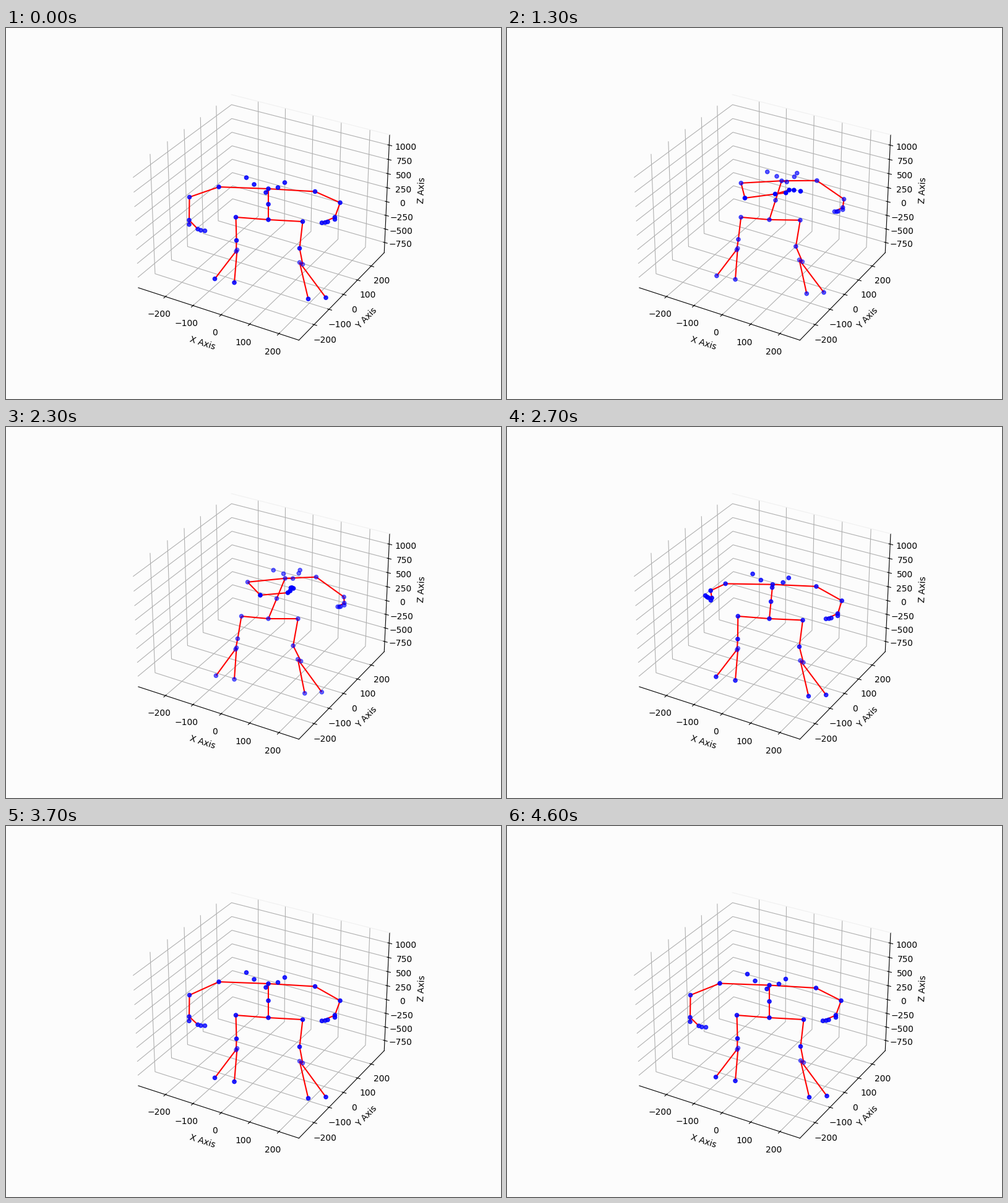
A matplotlib script for the animation above (4.7 s loop, 800 by 600 pixels).

```python
import numpy as np
import matplotlib.pyplot as plt
from matplotlib.animation import FuncAnimation
from matplotlib.collections import LineCollection

W, H, DPI = 800, 600, 100
FRAMES, STEP = 47, 100
LOOP = FRAMES * STEP
BG = "#fcfcfc"
PELVIS = np.array([423.5, 309.5])

# Ready stance (x, y) and how far a full body turn moves each joint (dx, dy)
UPPER = dict(
    neck=(423.5, 257, 28.5, -15.5), nose=(419.5, 263, 46, -21.5),
    eye_r=(400.5, 250, 50, -16), eye_l=(439, 255, 35.5, -22),
    ear_r=(388, 239, 46, -10.5), ear_l=(450, 247, 26, -19),
    shoulder_r=(343.5, 254, 49, -6), shoulder_l=(499, 261.5, 2, -22.5))
LOWER = dict(
    elbow_l=(539.5, 282, 6.5, -8), wrist_l=(531, 305.5, 16, -22.5), tip_l=(510, 314.5, 27, -25.5),
    hip_r=(371, 305.5, 9.5, 0), knee_r=(372, 342.5, 2, 0), ankle_r=(373, 357.5, -1, 0),
    toe_r=(337, 403.5, 2, 0), ball_r=(368.5, 409.5, 0, 0),
    hip_l=(479, 312.5, -8, -3), knee_l=(474, 355, -11, -1), ankle_l=(474, 377.5, -3, -1),
    toe_l=(488, 435.5, -6, -3), ball_l=(516.5, 433.5, -7, -3))

CHAINS = """pelvis spine neck nose
shoulder_r neck shoulder_l elbow_l wrist_l tip_l
wrist_l thumb_l
shoulder_r elbow_r wrist_r index_r
wrist_r thumb_r
pelvis hip_r knee_r heel_r ankle_r toe_r
ankle_r ball_r
pelvis hip_l knee_l heel_l ankle_l toe_l
ankle_l ball_l"""
BONES = [pair for chain in map(str.split, CHAINS.splitlines())
         for pair in zip(chain, chain[1:])]


# Keys: time, then body turn, torso drop, right elbow, wrist and fingertip
def swing(t, turn, drop, elbow, wrist, tip):
    return t, np.array([turn, drop, *elbow, *wrist, *tip], float)


def ready(t, drop):
    return swing(t, 0, drop, (296, 273), (295.5, 309 + drop / 2), (321, 325 + drop))


def back(t, x):
    return swing(t, -.12, 0, (x + 38, 270), (x + 22, 298), (x, 306))


def follow(t, turn, y):
    return swing(t, turn, 0, (405, 258), (452, y + 26), (476, y))


KEYS = [
    ready(0, 2.5), back(300, 235),
    swing(600, 1, -1.5, (395, 273.5), (463.5, 280), (497.5, 282)),
    follow(700, 1, 203), back(1100, 269),
    swing(1300, .7, .5, (384, 274.5), (433, 268), (474, 263.5)),
    follow(1480, .8, 229), back(1850, 250),
    swing(2300, .95, 2, (410.5, 271.5), (455, 267.5), (464, 260.5)),
    follow(2450, .95, 209), back(2850, 262),
    swing(3100, .55, -2, (377.5, 280), (404, 280), (439, 276.5)),
    follow(3250, .8, 219), back(3580, 268), ready(3700, -2.5),
    swing(3980, .75, 0, (394, 275), (430, 273), (452, 268)),
    back(4250, 265), ready(4600, 0),
]


def key(i):
    turn, k = divmod(i, len(KEYS))
    t, v = KEYS[k]
    return t + turn * LOOP, v


def slope(i):
    (t0, v0), (t1, v1) = key(i - 1), key(i + 1)
    return (v1 - v0) / (t1 - t0)


def control(t):
    """Cyclic Hermite curve through the keys."""
    i = sum(k[0] <= t for k in KEYS) - 1
    (t0, v0), (t1, v1) = key(i), key(i + 1)
    d = t1 - t0
    s = (t - t0) / d
    return (v0 + (v1 - v0) * s * s * (3 - 2 * s)
            + d * s * (1 - s) ** 2 * slope(i)
            - d * s * s * (1 - s) * slope(i + 1))


def hand(side, wrist, tip, flat, size):
    """Fingers bow between wrist and tip; the thumb hangs until the hand is flat."""
    reach = tip - wrist
    sag = size * (5 - 9 * flat)
    pts = {"thumb": wrist + .42 * flat * reach + (0, 7 * size * (1 - flat))}
    for name, f in (("index", .55), ("middle", .74)):
        pts[name] = wrist + f * reach + (0, sag * np.sin(np.pi * f))
    return {f"{name}_{side}": p for name, p in pts.items()}


def joints(t):
    """Joint positions and marker opacities by name."""
    turn, drop, *arm = control(t)
    flat = np.clip(2 * turn, 0, 1)
    sway = 4.5 * np.cos(2 * np.pi * (t - 3900) / LOOP)
    p = {"pelvis": PELVIS}
    for name, (x, y, dx, dy) in (UPPER | LOWER).items():
        y += drop if name in UPPER else sway * max(y - PELVIS[1], 0) / 125
        p[name] = np.array([x + turn * dx, y + turn * dy])
    p["spine"] = (PELVIS + p["neck"]) / 2
    p["heel_r"] = p["ankle_r"] + (-1.5, 2.5)
    p["heel_l"] = p["ankle_l"] + (5, 3)
    p |= hand("l", p["wrist_l"], p["tip_l"], 0, .5)
    elbow, wrist, tip = np.reshape(arm, (3, 2))
    right = dict(elbow_r=elbow, wrist_r=wrist, tip_r=tip) | hand("r", wrist, tip, flat, 1)
    p |= right

    shade = dict.fromkeys(p, .85 - .28 * np.clip(turn, 0, 1))
    shade |= dict.fromkeys(right, .78 + .22 * flat)
    shade |= dict.fromkeys(("ankle_r", "ankle_l", "heel_r", "heel_l"), .52)
    return p, shade


fig = plt.figure(figsize=(W / DPI, H / DPI), dpi=DPI, facecolor=BG)
ax = fig.add_subplot(projection="3d", facecolor=BG)
XL, YL, ZL = (-300, 267.5), (-298.5, 298.5), (-940, 1180)
ax.plot(XL, [YL[1]] * 2, [ZL[1]] * 2, color="#f0f0f0", lw=.8)
ax.set_xlim(*XL, view_margin=0)
ax.set_ylim(*YL, view_margin=0)
ax.set_zlim(*ZL, view_margin=0)
ax.set_xticks(range(-200, 201, 100))
ax.set_yticks(range(-200, 201, 100))
ax.set_zticks(range(-750, 1001, 250))
ax.set(xlabel="X Axis", ylabel="Y Axis", zlabel="Z Axis")
for axis in (ax.xaxis, ax.yaxis, ax.zaxis):
    axis.set_pane_color((1, 1, 1, 0))

# Flat layer in pixel coordinates for the figure
stage = fig.add_axes([0, 0, 1, 1])
stage.set(xlim=(-.5, W - .5), ylim=(H - .5, -.5))
stage.axis("off")
bones = stage.add_collection(LineCollection([], colors="red", linewidths=1.5, zorder=2))
dots = stage.scatter([], [], s=20, zorder=3)


def draw(n):
    p, shade = joints(n * STEP)
    bones.set_segments([(p[a], p[b]) for a, b in BONES])
    rgba = [(0, 0, 1, shade[name]) for name in p]
    dots.set_offsets(list(p.values()))
    dots.set_facecolor(rgba)
    dots.set_edgecolor(rgba)
    return bones, dots


anim = FuncAnimation(fig, draw, frames=FRAMES, interval=STEP, repeat=True, repeat_delay=0)
plt.show()
```
